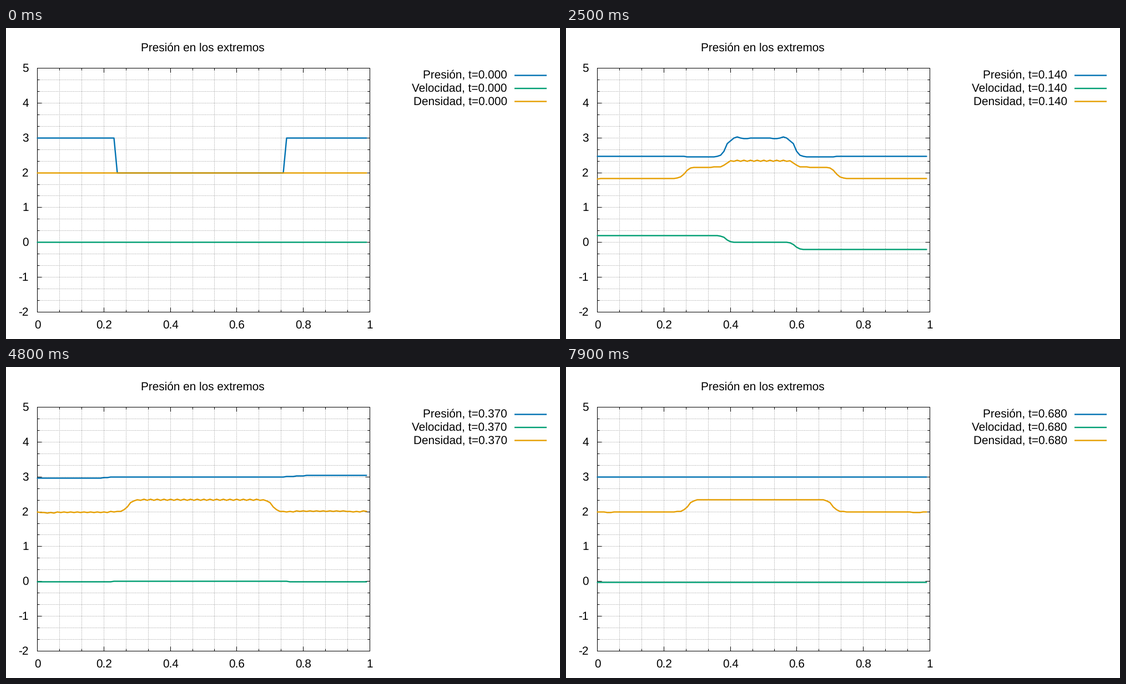
Write a matplotlib script that moves like this. It is 998 px wide and 561 px high and loops after 8000 ms.

```python
import numpy as np
import matplotlib.pyplot as plt
from matplotlib.animation import FuncAnimation

W, H, DPI = 998, 561, 100
PX = 72 / DPI                      # one pixel in points
LEFT, RIGHT, TOP, BOTTOM = 56.5, 655.5, 72.5, 512.5
FRAMES, STEP_MS, HOLD = 80, 100, 11

plt.rcParams["font.family"] = "Liberation Sans"
plt.rcParams["text.hinting"] = "none"

X = np.arange(100) / 100
ZIGZAG = np.where(np.arange(100) % 2 == 0, 1.0, -1.0)
MID = 0.49                         # symmetry point of the tube
JUMP = 0.235                       # starting discontinuity
T_HIT = (MID - JUMP) / 2.7         # both shocks meet
T_STOP = 0.186                     # contact comes to rest
REST = JUMP + 0.2 * T_STOP


def centre(v):
    """Centre of the pixel that holds v."""
    return np.floor(v + 1e-6) + 0.5


def px(x):
    return centre(LEFT + x * (RIGHT - LEFT))


def py(y):
    return centre(BOTTOM - (y + 2) / 7 * (BOTTOM - TOP))


def rise(x, pos, width):
    return 0.5 * (1 + np.tanh((x - pos) / width))


def bump(x, pos, width):
    return np.exp(-((x - pos) / width) ** 2)


def half(x, t):
    """Waves born at the left discontinuity: pressure, velocity, density."""
    shock = JUMP + 2.7 * t if t < T_HIT else MID + 2.3 * (t - T_HIT)
    behind = 1 - rise(x, shock, 0.001 + 0.011 * min(1, t / 0.03))
    fan = rise(x, JUMP - 2.36 * t, 0.001 + min(0.42 * t, 0.036))
    contact = rise(x, JUMP + 0.2 * min(t, T_STOP),
                   0.001 + 0.013 * (1 - np.exp(-t / 0.05)))
    crossed = rise(x, MID, 0.02)
    outside = rise(x, 2 * MID - REST, 0.014)

    p = (0.53 * (1 - fan) + 0.015 * (1 - contact)
         + behind * (0.455 + 0.09 * crossed - 0.015 * outside))
    if t > T_HIT:
        d = shock - x
        ripple = (-0.05 * bump(d, 0.0155, 0.006) + 0.028 * bump(d, 0.035, 0.008)
                  - 0.024 * bump(d, 0.057, 0.012))
        p = p + ripple * crossed * min(1, (t - T_HIT) / 0.02)
    u = 0.2 * (fan + behind - 1)
    rho = (0.162 * (1 - fan) - 0.322 * (1 - contact)
           + behind * (0.16 + 0.025 * crossed - 0.023 * outside))
    rho = rho + 0.01 * ZIGZAG * fan * (1 - contact) * np.exp(-(t / 0.07) ** 2)
    return p, u, rho, behind


def echo(x, t):
    """Weak wave entering from the left end."""
    s = t - 0.297
    inner, outer = 2.65, 2.87
    t1 = REST / outer
    t2 = t1 + (2 * MID - 2 * REST) / inner
    pos = outer * s
    if s > t1:
        pos = REST + inner * (min(s, t2) - t1) + outer * max(0, s - t2)
    return 1 - rise(x, pos, 0.02)


def state(t):
    mirror = 2 * MID - X
    p1, u1, r1, b1 = half(X, t)
    p2, u2, r2, b2 = half(mirror, t)
    a, b = echo(X, t), echo(mirror, t)
    p = 2 + p1 + p2 - 0.036 * a + 0.036 * b
    u = u1 - u2 - 0.015 * (a + b)
    rho = 2 + r1 + r2 - 0.016 * a + 0.016 * b

    core = rise(X, REST, 0.01) * rise(mirror, REST, 0.01)
    noise = (0.011 * core * np.exp(-max(0, t - 0.45) / 0.3)
             + 0.008 * (1 - core) * np.exp(-max(0, t - 0.42) / 0.1))
    rho = rho + ZIGZAG * noise * b1 * b2
    early = np.clip((t - 0.1) / 0.04, 0, 1) * np.clip((0.33 - t) / 0.04, 0, 1)
    late = np.clip((t - 0.31) / 0.08, 0, 1)
    rho = rho - 0.013 * early * (bump(X, 0, 0.025) + bump(X, 0.99, 0.025))
    rho = rho - late * (0.028 * bump(X, 0.034, 0.018) + 0.022 * bump(X, 0.955, 0.025))
    return p, u, rho


fig = plt.figure(figsize=(W / DPI, H / DPI), dpi=DPI, facecolor="white")
ax = fig.add_axes([0, 0, 1, 1])
ax.set_xlim(0, W)
ax.set_ylim(H, 0)
ax.axis("off")


def line(x0, y0, x1, y1, **style):
    style = {"color": "black", "lw": PX, "solid_capstyle": "butt", "snap": False, **style}
    return ax.plot([x0, x1], [y0, y1], **style)


def label(x, y, text, ha="left"):
    return ax.text(x, y, text, ha=ha, va="baseline", fontsize=20.8 * PX, color="black")


dots = {"color": "#999999", "linestyle": (0, (1.1, 1.7)), "dash_capstyle": "butt", "zorder": 1}
for i in range(16):
    x = px(i / 15)
    size = 8 if i % 3 == 0 else 4
    if 0 < i < 15:
        line(x, BOTTOM, x, TOP, **dots)
    line(x, BOTTOM, x, BOTTOM - size)
    line(x, TOP, x, TOP + size)
    if i % 3 == 0:
        label(x, 542, f"{i / 15:g}", "center")
for i in range(22):
    y = py(-2 + i / 3)
    size = 8 if i % 3 == 0 else 4
    if 0 < i < 21:
        line(LEFT, y, RIGHT, y, **dots)
    line(LEFT, y, LEFT + size, y)
    line(RIGHT, y, RIGHT - size, y)
    if i % 3 == 0:
        label(41, y + 6.5, str(i // 3 - 2), "right")
ax.plot([LEFT, RIGHT, RIGHT, LEFT, LEFT], [BOTTOM, BOTTOM, TOP, TOP, BOTTOM],
        color="black", lw=PX, snap=False)
label(242.6, 42, "Presión en los extremos")

SERIES = [("Presión", "#0072b2", 751.4),
          ("Velocidad", "#009e73", 730.8),
          ("Densidad", "#e69f00", 734.1)]
curves, keys = [], []
for i, (name, color, x) in enumerate(SERIES):
    y = 85.5 + 23.5 * i
    stroke = {"color": color, "lw": 2.4 * PX, "zorder": 4 + i, "snap": False}
    line(916, y, 974, y, **stroke)
    keys.append(label(x, y + 5.4, ""))
    curves += ax.plot([], [], solid_joinstyle="round", solid_capstyle="round", **stroke)


def draw(frame):
    t = max(0, frame - HOLD) / 100
    for (name, _, _), curve, key, values in zip(SERIES, curves, keys, state(t)):
        curve.set_data(px(X), py(values))
        key.set_text(f"{name}, t={t:.3f}")
    return curves + keys


anim = FuncAnimation(fig, draw, frames=FRAMES, interval=STEP_MS,
                     init_func=lambda: draw(0), repeat=True, repeat_delay=0, blit=False)
plt.show()
```
